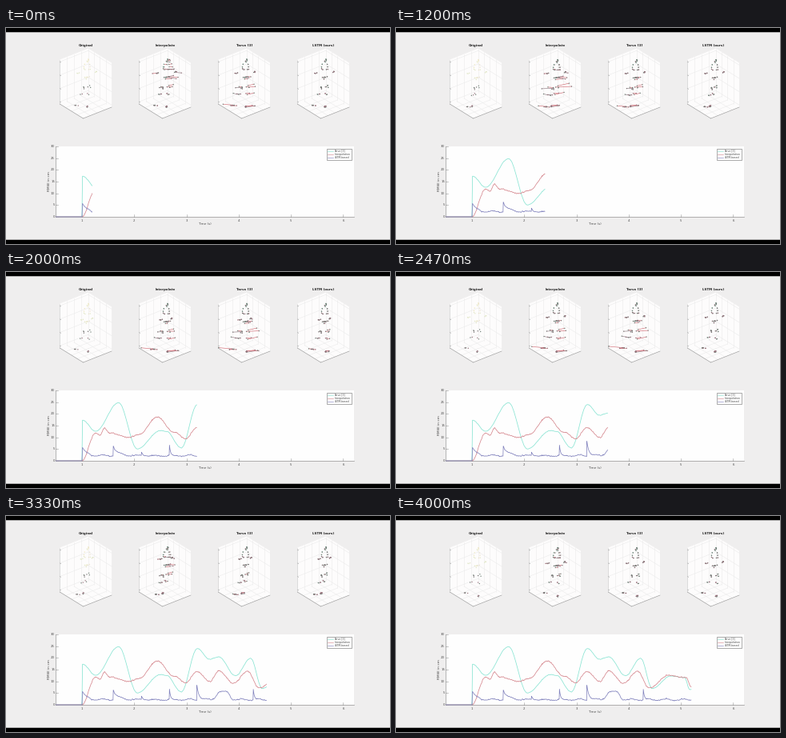
Animation of 480 by 270 pixels, one loop 4070 ms. Source, as a matplotlib script:

```python
import numpy as np
import matplotlib.pyplot as plt
from matplotlib.animation import FuncAnimation
from matplotlib.collections import LineCollection
from matplotlib.patches import Polygon, Rectangle

W, H, DPI = 480, 270, 100
PX = 72 / DPI
FRAMES, TICK = 110, 37          # 4070 ms
VIDEO_MS, STEPS = 200 / 3, 61   # the picture advances at 15 fps
STEP = 99
PANELS = ["Original", "Interpolate", "Tarve [3]", "LSTM (ours)"]
CYAN, RED, BLUE, GREY = "#86e4d2", "#d5868d", "#8182bd", "#858585"
rng = np.random.default_rng(4)

plt.rcParams["font.family"] = "DejaVu Sans"
fig = plt.figure(figsize=(W / DPI, H / DPI), dpi=DPI, facecolor="#efeeee")
ax = fig.add_axes([0, 0, 1, 1])
ax.set_xlim(0, W)
ax.set_ylim(H, 0)
ax.axis("off")


def line(xs, ys, color=GREY, width=0.6, **kw):
    return ax.plot(xs, ys, color=color, lw=width * PX, **kw)[0]


def seg(a, b, **kw):
    line([a[0], b[0]], [a[1], b[1]], **kw)


def label(x, y, s, size=3.9, **kw):
    opts = dict(ha="center", va="center", color="#4a4a4a")
    opts.update(kw)
    ax.text(x, y, s, fontsize=size * PX, **opts)


def box(x, y, w, h, face, edge="none", z=0, snap=None):
    ax.add_patch(Rectangle((x, y), w, h, fc=face, ec=edge, lw=0.6 * PX,
                           zorder=z, snap=snap))


BAR = (H - W / 1.85) / 2
box(0, 0, W, BAR, "black", snap=False)
box(0, H - BAR, W, BAR, "black", snap=False)

# --- 3D boxes -------------------------------------------------------------
LEFT, FRONT, RIGHT = np.array([[67.3, 95], [96.5, 113], [132, 99]])
BACK = LEFT + RIGHT - FRONT
UP = np.array([0, -55.5])


def draw_box(dx):
    l, f, r, b = (p + [dx, 0] for p in (LEFT, FRONT, RIGHT, BACK))
    hull = [l, f, r, r + UP, b + UP, l + UP]
    ax.add_patch(Polygon(hull, fc="#fdfcfc", ec="none", zorder=0))
    grid = dict(color="#eaeaea", width=0.5, zorder=1)
    for k in np.linspace(0.05, 0.95, 4):
        h = UP * k
        seg(l + h, b + h, **grid)
        seg(b + h, r + h, **grid)
        seg(l + h, l + h + [1.3, 0.7], width=0.5)
    for k in (0.25, 0.5, 0.75):
        p, q = l + (b - l) * k, b + (r - b) * k
        seg(p, p + UP, **grid)
        seg(q, q + UP, **grid)
        seg(p, p + f - l, **grid)
        seg(q, q + f - r, **grid)
    seg(b, b + UP, **grid)
    seg(l, l + UP, color="#c2c2c2", width=0.5)
    seg(l, f, color="#999999")
    seg(f, r, color="#999999")


for i, title in enumerate(PANELS):
    draw_box(STEP * i)
    label(100 + STEP * i, 22, title, 3.95, weight="bold", color="#262626")

# --- error chart ----------------------------------------------------------
X0, X1, Y0, Y1 = 62.3, 434.6, 148, 236
SEC, CM = 65.3, (Y1 - Y0) / 30


def sec_x(t):
    return X0 + (t - 0.5) * SEC


box(X0, Y0, X1 - X0, Y1 - Y0, "#fefefe")
line([X0, X0, X1], [Y0, Y1, Y1])
for s in range(1, 7):
    x = sec_x(s)
    line([x, x], [Y1, Y1 - 3], width=0.5)
    label(x, 240.5, str(s))
for v in range(0, 31, 5):
    y = Y1 - v * CM
    line([X0, X0 + 3], [y, y], width=0.5)
    label(61, y, str(v), ha="right")
label(248.3, 244.9, "Time (s)", 4.1)
label(54, 192, "RMSE in cm", 4.2, rotation=90)

# turning points of the two long curves: (seconds, cm)
TARVE = [(1, 0), (1.01, 17.3), (1.26, 12.6), (1.7, 24.7), (2.06, 5.1), (2.5, 12.9),
         (2.62, 12.5), (2.9, 5.5), (3.21, 24), (3.44, 19.4), (3.62, 20.4),
         (3.94, 12.4), (4.23, 19.8), (4.45, 7), (4.81, 12.3), (5.07, 11.6), (5.17, 6.5)]
INTERP = [(1, 0), (1.26, 11.8), (1.35, 10.9), (1.43, 14), (1.52, 11.9), (1.9, 9.9),
          (2.1, 11.3), (2.44, 18.8), (2.75, 12.4), (2.99, 9.4), (3.2, 14.2),
          (3.45, 9.9), (3.62, 14.5), (3.9, 9.2), (4.17, 14.3), (4.39, 7.2),
          (4.77, 12.6), (5.1, 11.6), (5.2, 7.5)]
# sudden rises that fade out: (seconds, cm, fade)
SPIKES = [(1.01, 3.4, 0.07), (1.6, 4, 0.08), (2.14, 1.4, 0.03),
          (2.675, 4.3, 0.02), (3.2, 6.5, 0.04), (4.28, 4.5, 0.02)]


def swing(points, t):
    """Cosine-eased path through turning points."""
    pt, pv = np.array(points).T
    k = np.clip(np.searchsorted(pt, t, "right") - 1, 0, len(pt) - 2)
    u = np.clip((t - pt[k]) / (pt[k + 1] - pt[k]), 0, 1)
    return pv[k] + (pv[k + 1] - pv[k]) * (1 - np.cos(np.pi * u)) / 2


def pulses(t):
    v = 2.2 + 0.3 * np.sin(19 * t) + 3.4 * np.exp(-((t - 3.7) / 0.15) ** 4)
    for t0, rise, fade in SPIKES:
        v = v + rise * np.exp(-np.maximum(t - t0, 0) / fade) * (t >= t0)
    return v * (t >= 1.005)


ts = np.arange(0.5, 5.21, 0.005)
ripple = np.convolve(rng.normal(0, 0.12, ts.size), np.ones(4) / 2, "same") * (ts > 1.03)
curves = [swing(TARVE, ts) + ripple / 2, swing(INTERP, ts) + ripple, pulses(ts) + ripple]
colors = [CYAN, RED, BLUE]
traces = [line([], [], c, 0.75, zorder=4) for c in colors]

box(400.7, 151, 31.6, 14, "white", "#777777", 5)
for k, name in enumerate(["Tarve [3]", "Interpolation", "LSTM-based"]):
    y = 153.8 + 4.2 * k
    line([402, 409], [y, y], colors[k], zorder=6)
    label(410.5, y, name, 3.1, ha="left", zorder=6)

# --- moving figure --------------------------------------------------------
# body parts: (x, y, markers, spread)
BODY = [(0, 42, 5, 3), (0, 50, 8, 5), (-9, 57, 3, 2), (9, 54, 3, 2), (0, 63, 6, 4),
        (-2, 74, 3, 2), (2, 73, 3, 2), (-6, 84, 2, 1.5), (1, 83, 2, 1.5),
        (-11, 97, 4, 2.5), (-1.5, 97, 4, 2.5)]
counts = [n for _, _, n, _ in BODY]
N = sum(counts)
home = np.repeat([[100 + x, y] for x, y, _, _ in BODY], counts, axis=0)
home = home + rng.uniform(-1, 1, (N, 2)) * np.repeat([s for *_, s in BODY], counts)[:, None]
part = np.repeat(np.arange(len(BODY)), counts)
side = np.where(np.isin(part, (2, 5, 7, 9)), -1, 1)
is_hand = np.isin(part, (2, 3))
leg = np.where(part >= 5, np.clip((home[:, 1] - 66) / 30, 0, 1), 0)
gain = rng.uniform(0.1, 1, N) ** 2
tilt = rng.uniform(-0.25, 0.2, N)


def pose(i):
    """Stepping figure: feet plant in turn, hands swing against them."""
    stride = -np.cos(2 * np.pi * (i - 18) / 28)
    x = 1.5 * (1 - leg) + leg * stride * np.where(side > 0, 4, -1.5)
    x = x + is_hand * side * 2.5 * np.sin(2 * np.pi * i / 19 + 1.5)
    y = 0.6 * np.sin(2 * np.pi * i / 14) - is_hand * 3 * np.sin(2 * np.pi * i / 37)
    y = y + leg * side * 1.5 * np.sin(2 * np.pi * i / 28)
    return home + np.column_stack([x, y])


def reach(k, i, y, cm):
    """Error length per marker, strongest around one body height."""
    longest = 26 * max(np.tanh((cm - 6) / 8), 0.08)
    focus = 75 - 18 * np.cos(2 * np.pi * i / 60) if k == 0 else 88
    return longest * gain * np.exp(-((y - focus) / 22) ** 2)


upper = home[:, 1] < 66
pick = rng.integers(0, 3, N)
dark = np.array(["#6d7d74", "#757171", "#94707a"])[pick]
body_colors = np.where(upper, np.array(["#6f9f8c", "#78877f", "#6d756f"])[pick], dark)
faded = np.where(upper, np.array(["#efe8bd", "#ece2cb", "#e0e6c4"])[pick], dark)
link_colors = np.where(rng.random(N) < 0.6, "#d4717a", "#948087")


def dots(cols):
    return ax.scatter(np.zeros(N), np.zeros(N), s=(1.35 * PX) ** 2, c=list(cols),
                      linewidths=0, zorder=8)


plain = dots(faded)
truth = [dots(body_colors) for _ in curves]
guess = [dots(dark) for _ in curves]
links = [ax.add_collection(LineCollection([], colors=list(link_colors),
                                          linewidths=0.65 * PX, zorder=6))
         for _ in curves]
rmse = [curves[1], curves[0], curves[2]]


def update(n):
    i = min(int((n + 0.6) * TICK / VIDEO_MS), STEPS - 1)
    now = 1.2 + i / 15
    shown = ts <= now
    for trace, cm in zip(traces, curves):
        trace.set_data(sec_x(ts[shown]), Y1 - cm[shown] * CM)

    pts = pose(i)
    plain.set_offsets(pts)
    for k, cm in enumerate(rmse):
        size = reach(k, i, pts[:, 1], np.interp(now, ts, cm))
        here = pts + [STEP * (k + 1), 0]
        there = here + np.column_stack([side * size, size * tilt])
        truth[k].set_offsets(here)
        guess[k].set_offsets(there)
        links[k].set_segments(np.stack([here, there], axis=1))
    return []


anim = FuncAnimation(fig, update, frames=FRAMES, interval=TICK,
                     repeat=True, repeat_delay=0, blit=False)
plt.show()
```
